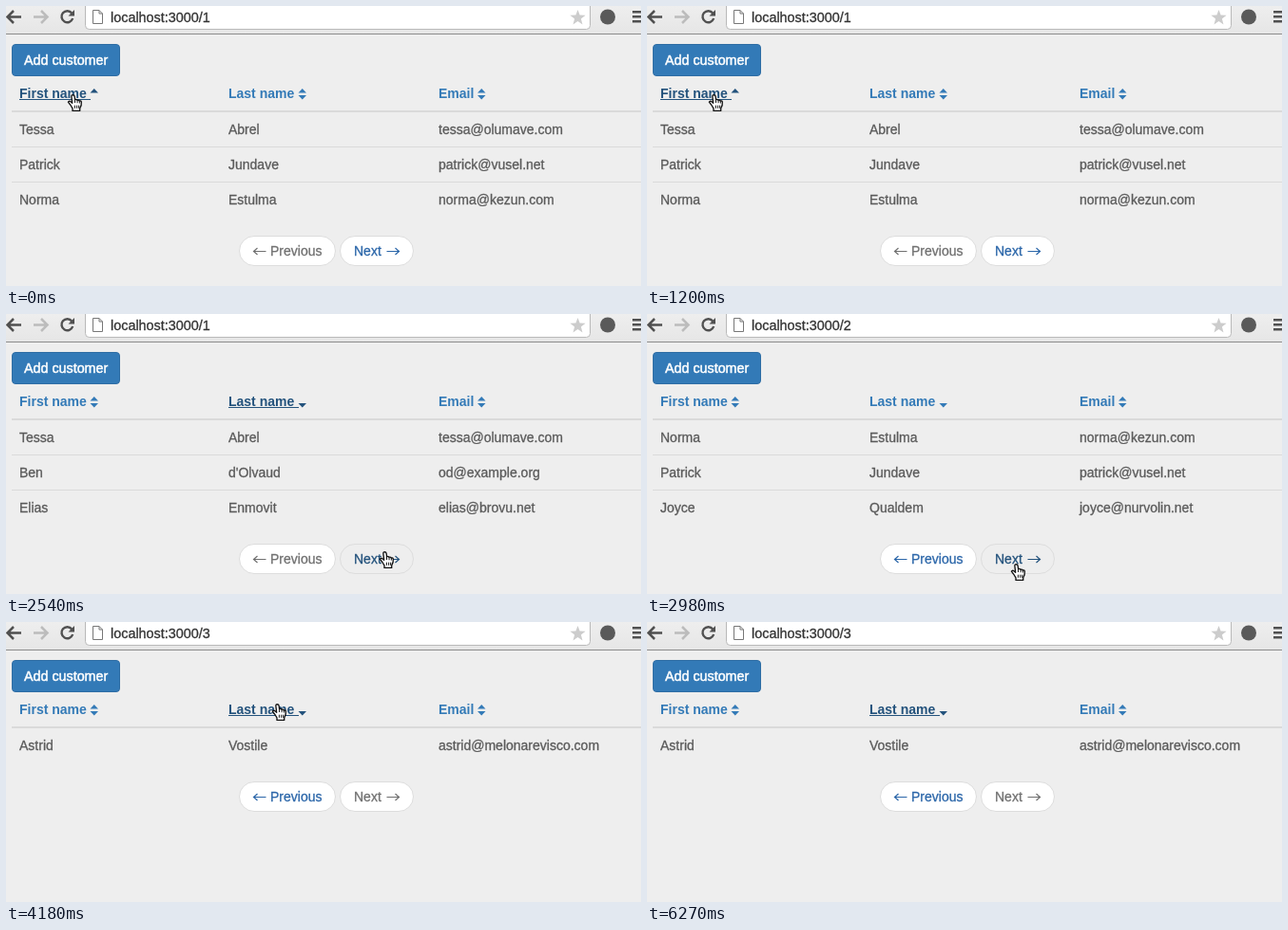
These frames come from a looping animation (668 by 295 pixels, 6.86 s). An HTML page with a canvas:

```html
<!DOCTYPE html>
<html lang="en">
<head>
<meta charset="utf-8">
<title>Customer table</title>
<style>
html, body { margin: 0; width: 100%; height: 100%; overflow: hidden; background: #eee; }
canvas { display: block; }
</style>
</head>
<body>
<canvas id="stage" width="668" height="295"></canvas>
<script>
const ctx = document.getElementById('stage').getContext('2d');
const LOOP = 6860, PER_PAGE = 3;
const FAMILY = '"Liberation Sans", Arial, sans-serif';
const LINK = '#337ab7', PAGER_LINK = '#2b66a9', ACTIVE = '#23527c';
const BODY = '#5a5a5a', MUTED = '#707070', RULE = '#dadada';

const customers = [
  ['Tessa', 'Abrel', 'tessa@olumave.com'],
  ['Ben', "d'Olvaud", 'od@example.org'],
  ['Elias', 'Enmovit', 'elias@brovu.net'],
  ['Norma', 'Estulma', 'norma@kezun.com'],
  ['Patrick', 'Jundave', 'patrick@vusel.net'],
  ['Joyce', 'Qualdem', 'joyce@nurvolin.net'],
  ['Astrid', 'Vostile', 'astrid@melonarevisco.com']
];

const columns = [
  { label: 'First name', x: 14, icon: 88.5 },
  { label: 'Last name', x: 234, icon: 307.5 },
  { label: 'Email', x: 455, icon: 496 }
];

// Each entry holds from its start time until the next one.
const views = [
  { at: 0, page: 1, sort: 0, asc: false, focus: 0 },
  { at: 600, page: 1, sort: 0, asc: true, focus: 0 },
  { at: 1200, page: 1, sort: 0, asc: false, focus: 0 },
  { at: 2100, page: 1, sort: 1, asc: true, focus: 1 },
  { at: 2830, page: 2, sort: 1, asc: true, focus: 'next' },
  { at: 3580, page: 3, sort: 1, asc: true, focus: null },
  { at: 4480, page: 3, sort: 1, asc: false, focus: 1 },
  { at: 5220, page: 3, sort: 1, asc: true, focus: 1 }
];

const pointer = [
  [0, 70, 94], [1500, 92, 97], [1650, 165, 98], [1800, 236, 95], [1950, 258, 93],
  [2250, 290, 112], [2390, 352, 196], [2540, 398, 251], [2690, 396, 256],
  [2830, 391, 262], [2980, 388, 264], [3730, 384, 248], [3880, 352, 180],
  [4030, 305, 114], [4180, 285, 87], [5520, 310, 78], [5670, 370, 60],
  [5820, 445, 78], [5970, 530, 140], [6120, 604, 225], [6270, -50, -50]
].map(([at, x, y]) => ({ at, x, y }));

const held = (list, t) => list.filter(entry => entry.at <= t).pop();
const within = (p, x, y, w, h) => p.x >= x && p.x < x + w && p.y >= y && p.y < y + h;

function rowsFor({ page, sort, asc }) {
  const key = row => row[sort].toLowerCase();
  const sorted = [...customers].sort((a, b) => (key(a) < key(b) ? -1 : 1) * (asc ? 1 : -1));
  return sorted.slice((page - 1) * PER_PAGE, page * PER_PAGE);
}

function rect(x, y, w, h, color) {
  ctx.fillStyle = color;
  ctx.fillRect(x, y, w, h);
}

// A thin outline gives the slightly heavy look of smoothed screen type.
function text(str, x, y, color, { bold = false, size = 14, weight = 0.3 } = {}) {
  ctx.font = `${bold ? 'bold ' : ''}${size}px ${FAMILY}`;
  ctx.fillStyle = ctx.strokeStyle = color;
  ctx.lineWidth = weight;
  ctx.fillText(str, x, y);
  if (!bold) ctx.strokeText(str, x, y);
}

function line(color, width, path) {
  ctx.strokeStyle = color;
  ctx.lineWidth = width;
  ctx.stroke(new Path2D(path));
}

function fillPath(path, color) {
  ctx.fillStyle = color;
  ctx.fill(new Path2D(path));
}

function roundBox(x, y, w, h, radius, fill, border) {
  const box = new Path2D();
  box.roundRect(x, y, w, h, radius);
  fillPath(box, fill);
  line(border, 1, box);
}

function drawStar(cx, cy, r) {
  ctx.beginPath();
  for (let i = 0; i < 10; i++) {
    const a = -Math.PI / 2 + i * Math.PI / 5, d = i % 2 ? r * 0.42 : r;
    ctx.lineTo(cx + d * Math.cos(a), cy + d * Math.sin(a));
  }
  ctx.closePath();
  ctx.fillStyle = '#ccc';
  ctx.fill();
}

function drawToolbar(page) {
  const shade = ctx.createLinearGradient(0, 0, 0, 29);
  shade.addColorStop(0, '#eee');
  shade.addColorStop(1, '#e6e6e6');
  rect(0, 0, 668, 29, shade);
  rect(0, 29, 668, 1, '#8c8c8c');
  roundBox(83.5, -6, 531, 30.5, 4, '#fff', '#b9b9b9');
  line('#505050', 2.5, 'M16 11.5H2M8 5L1.5 11.5L8 18');
  line('#bcbcbc', 2.5, 'M29 11.5H43M37 5L43.5 11.5L37 18');
  line('#505050', 2.4, 'M69.2 7.5A6 6 0 1 0 70.2 13');
  fillPath('M72 4V10.5H65.5Z', '#505050');
  line('#777', 1, 'M91.5 4.5H98L101.5 8V18.5H91.5ZM98 4.5V8H101.5');
  text('localhost:3000/' + page, 110, 17, '#333', { size: 14.4 });
  drawStar(601.5, 12.5, 8.5);
  ctx.beginPath();
  ctx.arc(633, 11.5, 8, 0, 7);
  ctx.fillStyle = '#5a5a5a';
  ctx.fill();
  for (const y of [5, 10, 15]) rect(659, y, 9, 2.5, '#505050');
}

function drawHeader(col, index, view, hover) {
  const active = view.focus === index || hover === index;
  const color = active ? ACTIVE : LINK;
  const unsorted = view.sort !== index;
  text(col.label, col.x, 97, color, { bold: true });
  if (active) rect(col.x, 98, col.icon - col.x + 0.5, 1, color);
  if (unsorted || !view.asc) fillPath(`M${col.icon} 91.5h8.5l-4.25 -4.5z`, color);
  if (unsorted || view.asc) fillPath(`M${col.icon} 94h8.5l-4.25 4.5z`, color);
}

function drawPill(label, x, y, w, { back = false, enabled, active }) {
  const color = !enabled ? MUTED : active ? ACTIVE : PAGER_LINK;
  const left = x + 15.5, right = x + w - 15.5, mid = y + 16.5;
  roundBox(x + 0.5, y + 0.5, w - 1, 31, 15.5, active ? '#eee' : '#fff', '#ddd');
  text(label, back ? x + 33 : x + 15, y + 21, color);
  line(color, 1.2, back
    ? `M${left + 13} ${mid}H${left}m4 -3.5l-4 3.5l4 3.5`
    : `M${right - 13} ${mid}H${right}m-4 -3.5l4 3.5l-4 3.5`);
}

function drawPointer(p, overLink) {
  ctx.save();
  ctx.lineJoin = 'round';
  if (overLink) {
    ctx.translate(p.x - 5.5, p.y - 1);
    ctx.scale(1.1, 1.06);
    const hand = 'M5.3 .7Q3.8 .7 4 2.5L4.7 8.8L3 7.2Q1.4 6.3 .8 7.7L3.4 11.3L5 14V16.4H12V14' +
      'Q13.8 11 13.5 7.5Q13 6.2 11.7 6.7Q11 5.4 9.6 5.9Q8.8 4.9 7.3 5.2L6.9 2Q6.7 .7 5.3 .7Z';
    fillPath(hand, '#fff');
    line('#111', 1.2, hand);
    line('#111', 0.9, 'M7.3 5.2V8.5M9.6 5.9V8.7M11.7 6.7V9M7.2 11V14M9.2 11V14M11 11V14');
  } else {
    ctx.translate(p.x, p.y);
    const arrow = 'M.5 .5V14.5L3.8 11.5L6.2 17.2L8.7 16.1L6.3 10.6H10.6Z';
    line('#fff', 2, arrow);
    fillPath(arrow, '#111');
  }
  ctx.restore();
}

function draw(t) {
  const view = held(views, t), p = held(pointer, t);
  const rows = rowsFor(view);
  const pagerY = 131 + rows.length * 37;
  const hasPrev = view.page > 1, hasNext = view.page < 3;

  let hover = columns.findIndex(c => within(p, c.x, 84, c.icon + 9 - c.x, 17));
  if (hasNext && within(p, 351, pagerY, 78, 32)) hover = 'next';

  rect(0, 0, 668, 295, '#eee');
  drawToolbar(view.page);
  roundBox(6.5, 40.5, 113, 33, 3.5, LINK, '#2e6da4');
  text('Add customer', 19, 62, '#fff', { size: 14.3, weight: 0.5 });

  columns.forEach((col, i) => drawHeader(col, i, view, hover));
  rect(6, 110, 662, 2, RULE);
  rows.forEach((row, r) => {
    if (r) rect(6, 111 + r * 37, 662, 1, RULE);
    row.forEach((cell, c) => text(cell, columns[c].x, 135 + r * 37, BODY));
  });

  drawPill('Previous', 245, pagerY, 102, { back: true, enabled: hasPrev, active: false });
  drawPill('Next', 351, pagerY, 78, {
    enabled: hasNext,
    active: hover === 'next' || view.focus === 'next'
  });
  drawPointer(p, hover !== -1);
}

const start = performance.now();
function tick() {
  draw((performance.now() - start) % LOOP);
  requestAnimationFrame(tick);
}
tick();
</script>
</body>
</html>
```
